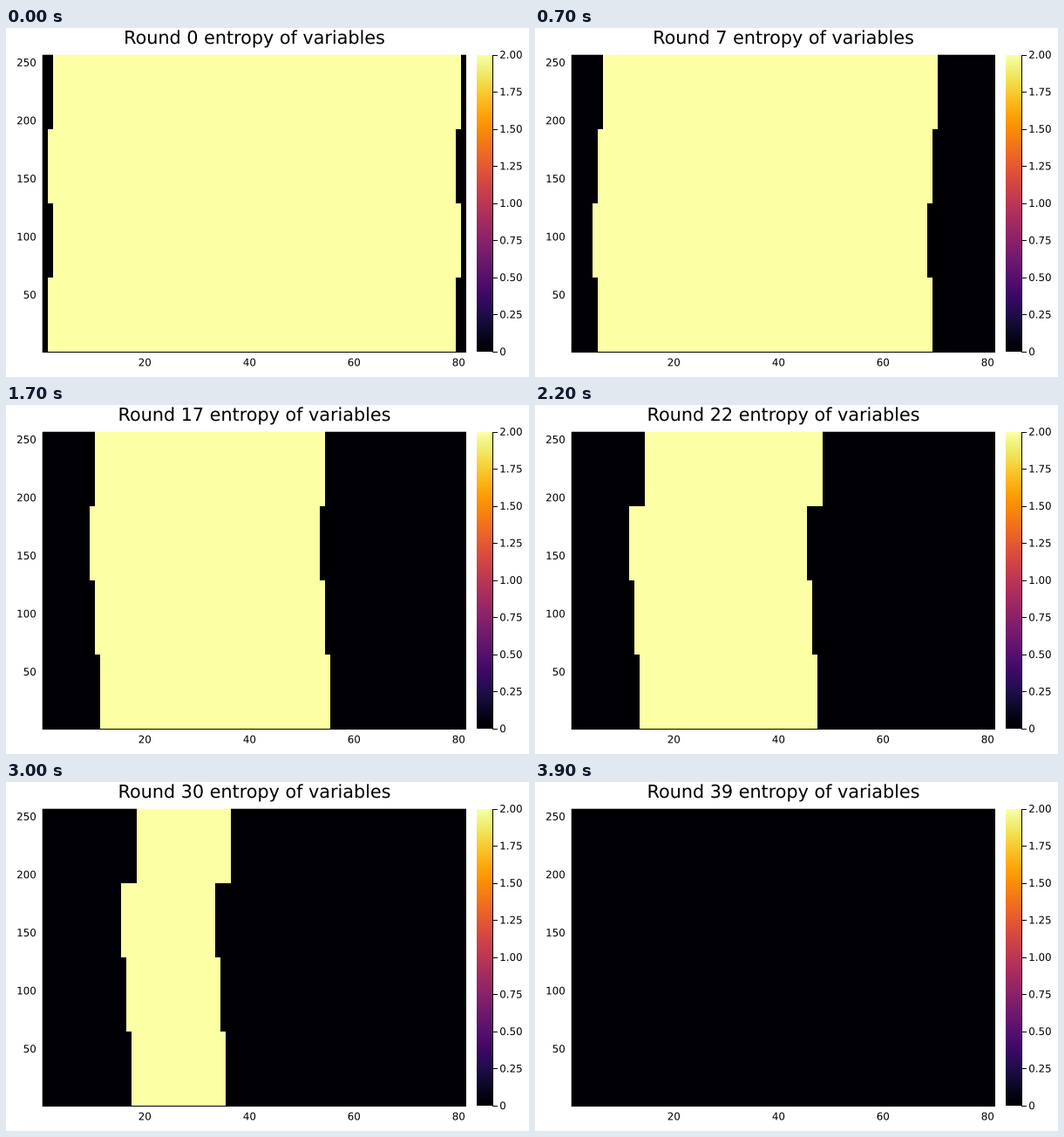
Write a matplotlib script that moves like this. It is 600 by 400 pixels and loops after 4 s.

```python
import math

import numpy as np
import matplotlib.pyplot as plt
from matplotlib.animation import FuncAnimation
from matplotlib.patches import PathPatch, Rectangle
from matplotlib.textpath import TextPath
from matplotlib.transforms import Affine2D

DPI = 100
WIDTH, HEIGHT = 600, 400
ROUNDS = 40

# Heatmap geometry in pixels: 81 columns, 256 rows in four equal bands
LEFT, TOP, RIGHT, BOTTOM = 42, 31, 528, 371
CELL = 6
BAND = (BOTTOM - TOP) / 4
BLEED = 0.3  # the map reaches slightly past its top left pixel corner
BAR_LEFT, BAR_RIGHT = 540, 558

FONT = {"family": "DejaVu Sans"}
TITLE_SIZE = 20.73
TICK_SIZE = 11.85
INFERNO = plt.get_cmap("inferno")
LOW, HIGH = INFERNO(0.0), INFERNO(1.0)

fig = plt.figure(figsize=(WIDTH / DPI, HEIGHT / DPI), dpi=DPI, facecolor="white")
ax = fig.add_axes([0, 0, 1, 1])


def text_path(text, x, baseline, size, align="left"):
    path = TextPath((0, 0), text, size=size, prop=FONT)
    box = path.get_extents()
    shift = {"left": 0, "center": (box.x0 + box.x1) / 2, "right": box.x1}[align]
    move = Affine2D().translate(-shift, 0).scale(1, -1).translate(x, baseline)
    return path.transformed(move)


def add_text(*args):
    patch = PathPatch(text_path(*args), facecolor="black", linewidth=0, snap=False)
    return ax.add_patch(patch)


def add_box(x, y, w, h, color):
    return ax.add_patch(Rectangle((x, y), w, h, facecolor=color,
                                  linewidth=0, snap=False))


def title_path(step):
    return text_path(f"Round {step} entropy of variables",
                     (LEFT + RIGHT) / 2 + 0.5, 18.1, TITLE_SIZE, "center")


def band_edges(band, step):
    """Pixel edges of the undetermined part; band 0 is the lowest."""
    first = 1 + band % 2 + 2 * ((step + (band - 1) % 4) // 4)
    last = first + 78 - 2 * step
    return LEFT + CELL * first, LEFT + CELL * last


def add_band(band):
    """Dark, bright and dark stretch of one band."""
    top = BOTTOM - (band + 1) * BAND
    height = BAND
    if band == 3:
        top, height = top - BLEED, height + BLEED
    return [add_box(LEFT, top, 0, height, c) for c in (LOW, HIGH, LOW)]


def draw_axes():
    add_box(LEFT, BOTTOM, RIGHT - LEFT, 1, "black")
    add_box(LEFT - BLEED, TOP, BLEED, BOTTOM + 1 - TOP, "black")
    for value in range(20, 81, 20):
        x = LEFT + CELL * (value - 0.5)
        add_text(str(value), x + 0.3, 387.4, TICK_SIZE, "center")
    for value in range(50, 251, 50):
        y = BOTTOM + 0.5 - (value - 0.5) * (BOTTOM - TOP + 0.8) / 256
        add_text(str(value), 34, y + 4.4, TICK_SIZE, "right")


def draw_colorbar():
    ramp = np.linspace(1, 0, 256)[:, None]
    ax.imshow(ramp, cmap=INFERNO, aspect="auto", interpolation="nearest",
              extent=(BAR_LEFT, BAR_RIGHT, BOTTOM, TOP), zorder=0.4)
    add_box(BAR_RIGHT, TOP, 1, BOTTOM + 1 - TOP, "black")
    for i in range(9):
        y = BOTTOM + 0.3 - i * (BOTTOM - TOP + 0.3) / 8
        add_box(BAR_RIGHT, math.floor(y + 1e-6), 6, 1, "black")
        label = f"{i / 4:.2f}" if i else "0"
        add_text(label, 566.2, y + 3.8, TICK_SIZE)


draw_axes()
draw_colorbar()
bands = [add_band(b) for b in range(4)]
title = ax.add_patch(PathPatch(title_path(0), facecolor="black",
                               linewidth=0, snap=False))
ax.set_xlim(0, WIDTH)
ax.set_ylim(HEIGHT, 0)
ax.axis("off")


def update(step):
    title.set_path(title_path(step))
    for b, parts in enumerate(bands):
        edges = [LEFT, *band_edges(b, step), RIGHT]
        for rect, start, end in zip(parts, edges, edges[1:]):
            rect.set_x(start)
            rect.set_width(end - start)
            rect.set_visible(end > start)
    return [title, *sum(bands, [])]


anim = FuncAnimation(fig, update, frames=ROUNDS, interval=100,
                     repeat=True, repeat_delay=0, blit=False)
plt.show()
```
